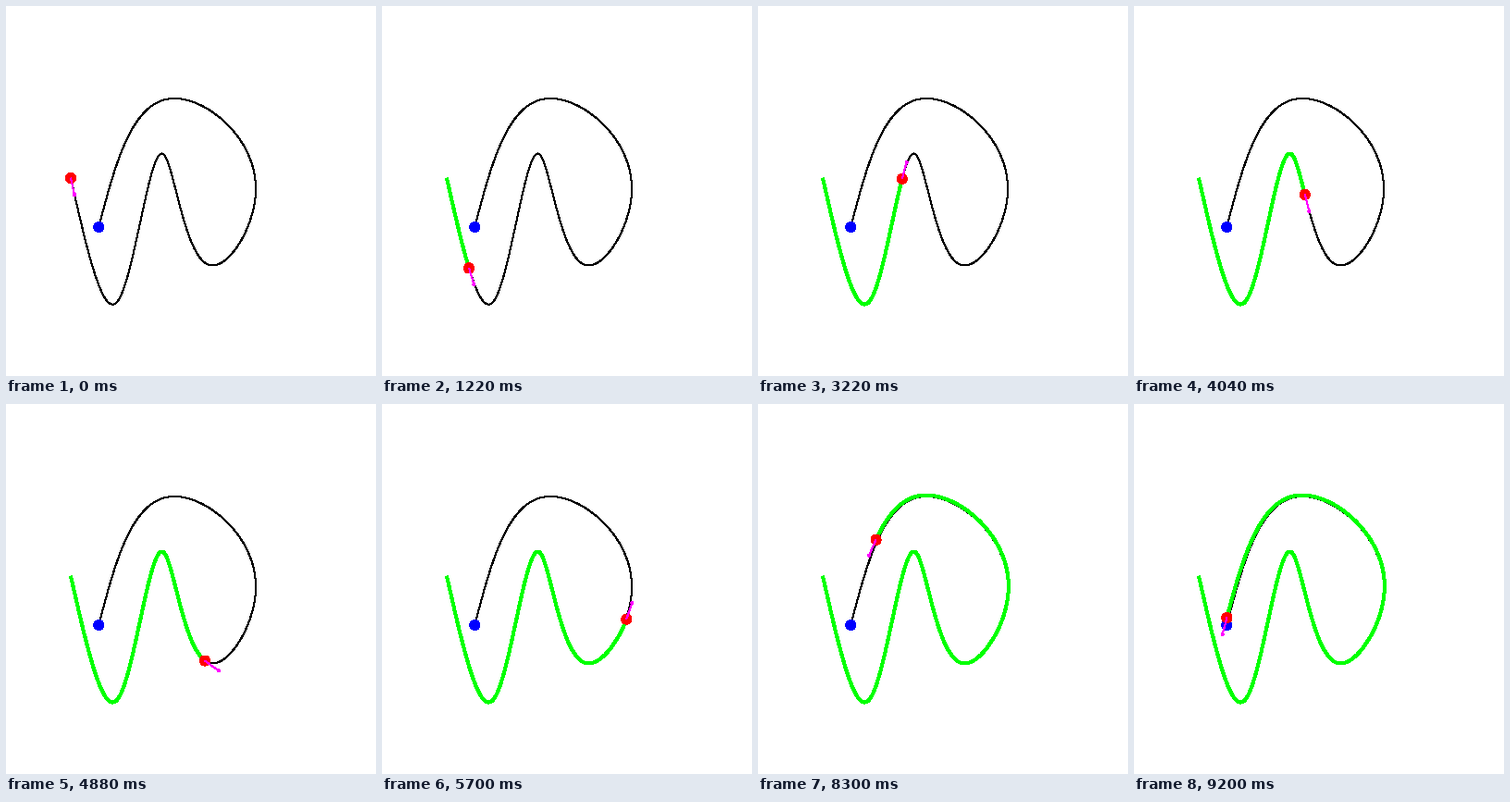
Write a matplotlib script that moves like this. It is 400x400 px and loops after 9240 ms.

```python
import numpy as np
import matplotlib.pyplot as plt
from matplotlib.animation import FuncAnimation
from matplotlib.patches import Circle

SIZE, DPI = 400, 100
PX = 72 / DPI            # points per pixel
FRAMES, LAST = 462, 460
NEEDLE = 18.5


def spline(t, y, q):
    """Natural cubic spline through (t, y), evaluated at q."""
    t, y = np.asarray(t, float), np.asarray(y, float)
    h, n = np.diff(t), len(t)
    A, b = np.eye(n), np.zeros(n)
    for i in range(1, n - 1):
        A[i, i - 1:i + 2] = h[i - 1], 2 * (h[i - 1] + h[i]), h[i]
        b[i] = 6 * ((y[i + 1] - y[i]) / h[i] - (y[i] - y[i - 1]) / h[i - 1])
    m = np.linalg.solve(A, b)
    k = np.clip(np.searchsorted(t, q, side="right") - 1, 0, n - 2)
    u, v, d = t[k + 1] - q, q - t[k], h[k]
    return ((m[k] * u**3 + m[k + 1] * v**3) / (6 * d)
            + (y[k] / d - m[k] * d / 6) * u
            + (y[k + 1] / d - m[k + 1] * d / 6) * v)


def lag(n):
    """Pixels lost while the robot picks up speed."""
    return 18 * (1 - 0.9 ** n)


# Course through the waypoints, in world units, then pixels
wx = np.array([-2.5, 0, 2.5, 5, 7.5, 3, -1])
wy = np.array([0.7, -6, 2, -4, 0, 5, -2])
arrive = np.array([0, 88, 178, 247, 303, 378, 464])    # step at each waypoint

knots = np.r_[0, np.cumsum(np.hypot(np.diff(wx), np.diff(wy)))]
s = np.linspace(0, 41.5, 3000)
px = 120 + 20 * spline(knots, wx, s)
py = 200 - 20 * spline(knots, wy, s)
arc = np.r_[0, np.cumsum(np.hypot(np.diff(px), np.diff(py)))]
tx, ty = np.gradient(px, arc), np.gradient(py, arc)

# Distance travelled at each step
steps = np.arange(LAST + 1)
reach = np.interp(knots, s, arc)
dist = spline(arrive, reach + lag(arrive), steps) - lag(steps)

# Robot pose, drifting to the right of the course in the second half
hx, hy = np.interp(dist, arc, tx), np.interp(dist, arc, ty)
drift = 1.9 * np.sqrt(np.clip((steps - 270) / 190, 0, 1))
rx = np.interp(dist, arc, px) - hy * drift
ry = np.interp(dist, arc, py) + hx * drift

fig = plt.figure(figsize=(SIZE / DPI, SIZE / DPI), dpi=DPI, facecolor="white")
ax = fig.add_axes([0, 0, 1, 1])
ax.set_xlim(0, SIZE)
ax.set_ylim(SIZE, 0)
ax.axis("off")


# Hard-edged drawing fills every touched pixel, so sizes are about 1 px less
def line(x, y, color, width, z):
    return ax.plot(x, y, color=color, lw=width * PX, zorder=z, antialiased=False,
                   solid_capstyle="butt", solid_joinstyle="round")[0]


def dot(x, y, r, color, z):
    return ax.add_patch(Circle((x, y), r, fc=color, ec="none", lw=0,
                               zorder=z, antialiased=False))


line(px, py, "#000000", 1, 1)
dot(px[-1], py[-1], 5.5, "#0000ff", 2)
trail = line([], [], "#00ff00", 3, 3)
robot = dot(rx[0], ry[0], 5.5, "#ff0000", 4)
needle = line([], [], "#ff00ff", 1, 5)
tip = dot(rx[0], ry[0], 1.5, "#ff00ff", 5)


def update(frame):
    n = min(frame, LAST)
    x, y = rx[n], ry[n]
    ex, ey = x + NEEDLE * hx[n], y + NEEDLE * hy[n]
    trail.set_data(rx[:n + 1], ry[:n + 1])
    robot.center = x, y
    needle.set_data([x, ex], [y, ey])
    tip.center = ex, ey
    return trail, robot, needle, tip


anim = FuncAnimation(fig, update, frames=FRAMES, interval=20,
                     repeat=True, repeat_delay=0, blit=False)
plt.show()
```
